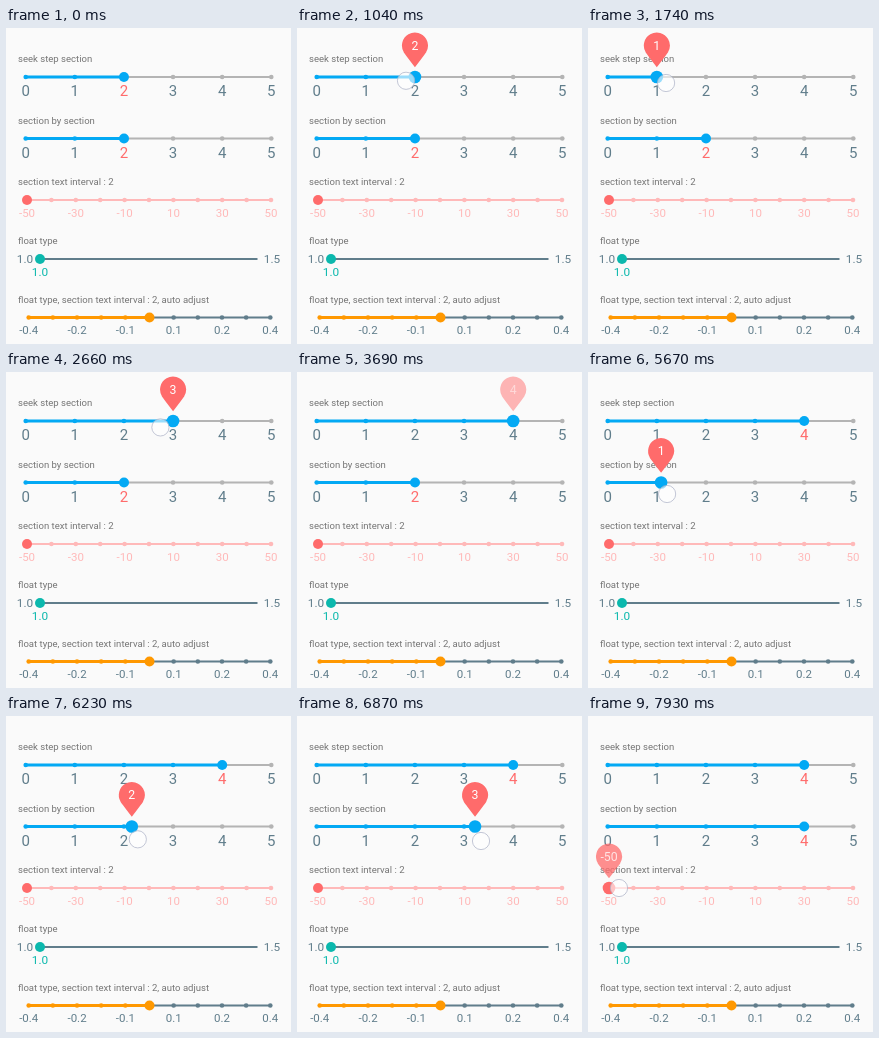
Animation, 285 px wide and 316 px high, one loop 7.99 s. Source, as an HTML page with a canvas:

```html
<!DOCTYPE html>
<html lang="en">
<head>
<meta charset="utf-8">
<title>Seek bars</title>
<style>
  html, body { margin: 0; width: 100%; height: 100%; overflow: hidden; background: #fafafa; }
  canvas { display: block; width: 285px; height: 316px; }
</style>
</head>
<body>
<canvas></canvas>
<script>
const WIDTH = 285, HEIGHT = 316, LOOP = 7990;
const BLUE = '#03a9f4', RED = '#ff6b6b', PINK = '#ffb9b9', TEAL = '#0bb8ad',
      ORANGE = '#ff9800', SLATE = '#607d8b', GRAY = '#b4b4b4', TITLE = '#757575';

const canvas = document.querySelector('canvas');
const ctx = canvas.getContext('2d');
const ratio = window.devicePixelRatio || 1;
canvas.width = WIDTH * ratio;
canvas.height = HEIGHT * ratio;

// Finger paths: [time, x, y]
const STEP_TOUCH = [
  [750, 124, 51], [880, 122, 52], [1500, 72, 55], [1620, 72, 55], [1740, 78, 55],
  [2320, 125, 55], [3120, 194, 56], [3440, 220, 56], [3570, 220, 56]
];
const SECTION_TOUCH = [
  [4170, 118, 114], [4300, 118, 115], [4680, 93, 119], [4920, 81, 120], [5270, 53, 121],
  [5670, 79, 122], [6520, 159, 124], [6870, 184, 125], [7340, 197, 127], [7390, 197, 127]
];
const LAST_TOUCH = [[7720, 31, 172], [LOOP, 31, 172]];
// Thumb path of the free-moving bar: [time, x]
const SECTION_THUMB = [
  [4170, 118], [4300, 118], [4680, 92], [4920, 78], [5270, 48], [5670, 73],
  [6520, 153], [6870, 178], [7340, 192], [7390, 192]
];

const clamp = v => Math.max(0, Math.min(1, v));
const ramp = (t, from, to) => clamp((t - from) / (to - from));
const easeOut = p => 1 - (1 - p) ** 2;

function along(keys, t, column = 1) {
  if (t <= keys[0][0]) return keys[0][column];
  const i = keys.findIndex(key => key[0] >= t);
  if (i < 0) return keys[keys.length - 1][column];
  const a = keys[i - 1], b = keys[i];
  return a[column] + (b[column] - a[column]) * ramp(t, a[0], b[0]);
}

function text(str, x, y, size, color, align = 'center') {
  ctx.font = `${size}px Roboto, sans-serif`;
  ctx.textAlign = align;
  ctx.fillStyle = color;
  ctx.fillText(str, x, y);
}

function disc(x, y, r, color) {
  ctx.fillStyle = color;
  ctx.beginPath();
  ctx.arc(x, y, r, 0, Math.PI * 2);
  ctx.fill();
}

function line(x1, x2, y, width, color) {
  ctx.strokeStyle = color;
  ctx.lineWidth = width;
  ctx.beginPath();
  ctx.moveTo(x1, y);
  ctx.lineTo(x2, y);
  ctx.stroke();
}

function seekBar({ left, right, y, sections, thumb, on, off, dragging, thumbColor = on }) {
  line(left, right, y, 2, off);
  line(left, thumb, y, 3.2, on);
  for (let i = 0; sections && i <= sections; i++) {
    const x = left + (right - left) * i / sections;
    disc(x, y, 2.3, x <= thumb + 0.1 ? on : off);
  }
  disc(thumb, y, dragging ? 6.3 : 5, thumbColor);
}

function labels(list, left, right, y, size, color, selected) {
  list.forEach((str, i) => text(str, left + (right - left) * i / (list.length - 1), y, size,
    i === selected ? RED : color));
}

function bubble(x, barY, str, alpha) {
  if (alpha <= 0) return;
  const r = 13, cy = barY - 31.5, side = r * Math.sqrt(3) / 2, low = cy + r / 2;
  ctx.globalAlpha = alpha;
  ctx.fillStyle = RED;
  ctx.beginPath();
  ctx.moveTo(x, cy + r * 5 / 3);
  ctx.quadraticCurveTo(x - side - 1.5, low - 1.5, x - side, low);
  ctx.arc(x, cy, r, Math.PI * 5 / 6, Math.PI / 6);
  ctx.quadraticCurveTo(x + side + 1.5, low - 1.5, x, cy + r * 5 / 3);
  ctx.fill();
  text(str, x, cy + 4.2, 12.3, '#fff');
  ctx.globalAlpha = 1;
}

function finger(keys, t) {
  if (t < keys[0][0] || t >= keys[keys.length - 1][0]) return;
  disc(along(keys, t), along(keys, t, 2), 8.6, 'rgba(255,255,255,.6)');
  ctx.strokeStyle = 'rgba(175,180,200,.75)';
  ctx.lineWidth = 1;
  ctx.stroke();
}

function draw(t) {
  ctx.setTransform(ratio, 0, 0, ratio, 0, 0);
  ctx.fillStyle = '#fafafa';
  ctx.fillRect(0, 0, WIDTH, HEIGHT);

  [['seek step section', 33.5], ['section by section', 95.5], ['section text interval : 2', 157],
   ['float type', 215.5], ['float type, section text interval : 2, auto adjust', 274.5]]
    .forEach(([str, y]) => text(str, 12, y, 9.55, TITLE, 'left'));

  const left = 19.7, right = 265.3, step = (right - left) / 5;
  const digits = [...'012345'];
  const blueBar = (y, thumb, dragging, selected) => {
    seekBar({ left, right, y, sections: 5, thumb, on: BLUE, off: GRAY, dragging });
    labels(digits, left, right, y + 19, 15, SLATE, dragging ? -1 : selected);
  };

  // Bar that snaps to whole sections while dragged
  const stepValue = Math.round((along(STEP_TOUCH, t) - left) / step);
  const stepThumb = left + stepValue * step;
  blueBar(49, stepThumb, t >= 750 && t < 3850, stepValue);

  // Bar that moves freely and settles on a section after release
  const settle = easeOut(ramp(t, 7390, 7590));
  const freeX = along(SECTION_THUMB, t);
  const sectionThumb = freeX + (left + 4 * step - freeX) * settle;
  const sectionValue = Math.round((sectionThumb - left) / step);
  blueBar(110.5, sectionThumb, t >= 4170 && t < 7620, sectionValue);

  seekBar({ left: 21, right: 265, y: 172, sections: 10, thumb: 21, on: PINK, off: PINK,
    thumbColor: RED, dragging: t >= 7720 });
  labels(['-50', '-30', '-10', '10', '30', '50'], 21, 265, 189, 11.5, PINK);

  seekBar({ left: 34, right: 251.5, y: 231, thumb: 34, on: TEAL, off: SLATE });
  text('1.0', 19, 235.3, 11.8, SLATE);
  text('1.5', 266, 235.3, 11.8, SLATE);
  text('1.0', 34, 248, 11.8, TEAL);

  seekBar({ left: 22.7, right: 264.3, y: 289.5, sections: 10, thumb: 143.5, on: ORANGE, off: SLATE });
  labels(['-0.4', '-0.2', '-0.1', '0.1', '0.2', '0.4'], 22.7, 264.3, 306, 11.5, SLATE);

  bubble(stepThumb, 49, stepValue, ramp(t, 770, 970) - ramp(t, 3580, 3800));
  bubble(sectionThumb, 110.5, sectionValue, ramp(t, 4190, 4390) - ramp(t, 7390, 7500));
  bubble(21, 172, '-50', ramp(t, 7780, 7980));

  [STEP_TOUCH, SECTION_TOUCH, LAST_TOUCH].forEach(keys => finger(keys, t));
}

const start = performance.now();
function tick() {
  draw((performance.now() - start) % LOOP);
  requestAnimationFrame(tick);
}
tick();
</script>
</body>
</html>
```
